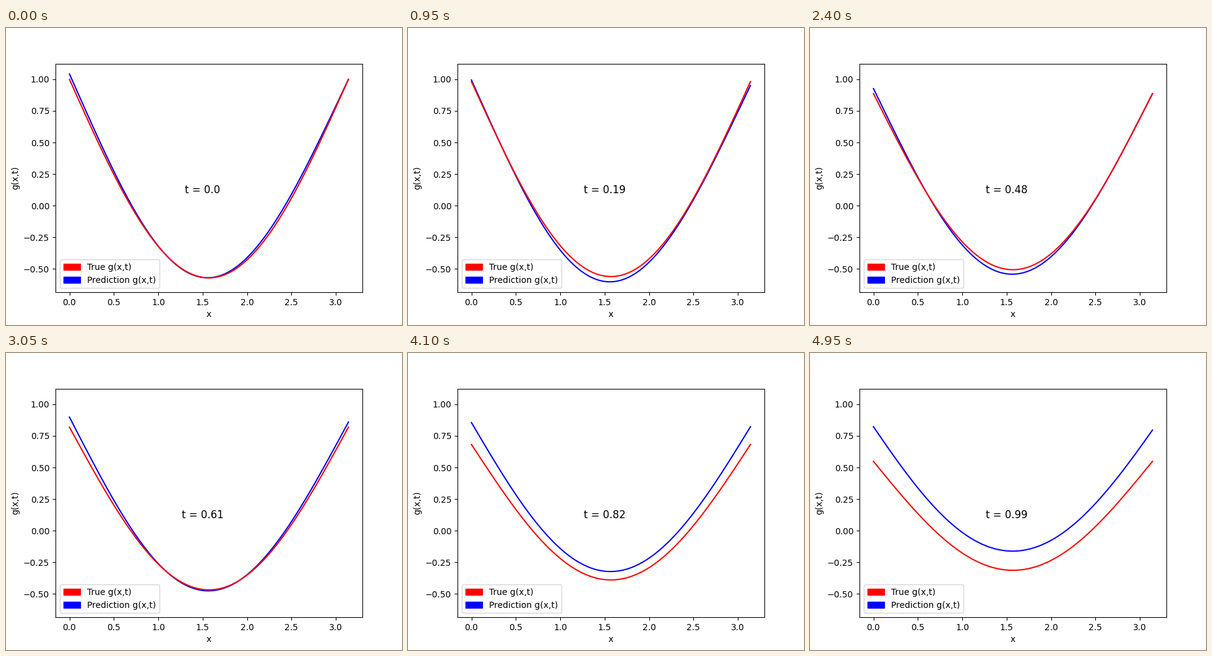
Write a matplotlib script that moves like this. It is 640 by 480 pixels and loops after 5000 ms.

```python
import numpy as np
import matplotlib.pyplot as plt
from matplotlib.animation import FuncAnimation
from matplotlib.patches import Patch

FRAMES = 100
x = np.linspace(0, np.pi, 100)
s = np.sin(x)


def true_g(t):
    return np.cos(t) * (1 - np.pi / 2 * s)


def predicted_g(t):
    """Curve through drifting end and middle values, with a slight asymmetry."""
    left = 1.042 - 0.257 * t + 0.036 * t**2
    right = 1.0 - 0.268 * t + 0.063 * t**2
    middle = -0.57 - 0.328 * t + 0.86 * t**2 - 0.113 * t**3
    bulge = 0.066 - 0.11 * t**2
    skew = 0.016 * t - 0.024

    end = (left + right) / 2
    even = end + (middle - end) * s + bulge * s * (1 - s)
    odd = (left - right) / 2 * np.cos(x) + skew * np.sin(2 * x)
    return even + odd


fig, ax = plt.subplots(figsize=(6.4, 4.8), dpi=100)
pred_line, = ax.plot(x, predicted_g(0), color="blue")
true_line, = ax.plot(x, true_g(0), color="red")
label = ax.text(1.5, 0.1, "", ha="center", fontsize=12)
ax.set_ylim(-0.6853, 1.124)
ax.set_xlabel("x")
ax.set_ylabel("g(x,t)")
ax.legend(
    handles=[Patch(color="red", label="True g(x,t)"),
             Patch(color="blue", label="Prediction g(x,t)")],
    loc="lower left",
)


def update(i):
    t = i / FRAMES
    pred_line.set_ydata(predicted_g(t))
    true_line.set_ydata(true_g(t))
    label.set_text(f"t = {round(t, 2)}")
    return pred_line, true_line, label


anim = FuncAnimation(fig, update, frames=FRAMES, interval=50, repeat=True)
plt.show()
```
